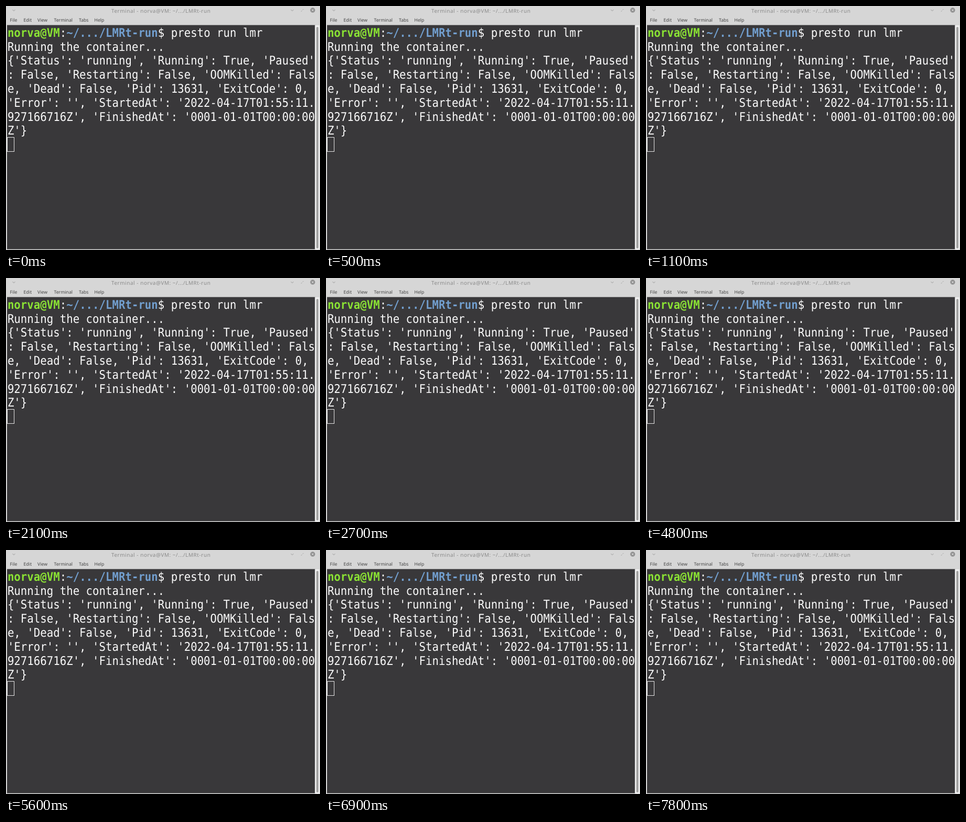
Animation of 599 by 467 pixels, one loop 8 s. Source, as an HTML page:

```html
<!DOCTYPE html>
<html lang="en">
<head>
<meta charset="utf-8">
<title>Terminal</title>
<style>
  html, body { margin: 0; width: 100%; height: 100%; overflow: hidden; background: #d6d6d6; }
  svg { display: block; width: 599px; height: 467px; }
  text { white-space: pre; text-rendering: geometricPrecision; }
  .ui { font-family: "Noto Sans", "Open Sans", sans-serif; }
  .title { font-size: 10px; letter-spacing: .53px; fill: #8a8a8a; }
  .menu { font-size: 8.7px; fill: #444; }
  .term { font: 20.72px "DejaVu Sans Mono", monospace; fill: #fafafa; }
  .user { font-weight: bold; fill: #8ae234; }
  .path { font-weight: bold; fill: #729fcf; }
  .icon { fill: none; stroke: #999; stroke-width: 1; }
</style>
</head>
<body>
<svg viewBox="0 0 599 467">
  <rect width="599" height="467" fill="#d6d6d6"/>
  <rect x="2" y="36.5" width="587.5" height="429" fill="#39383a"/>
  <rect x="589.5" y="37" width="8.5" height="429" fill="#f0f0f0"/>
  <rect x="592" y="40" width="4" height="424" rx="2" fill="#a2a2a2"/>

  <g class="icon">
    <path d="M12.5 7l2.5 2.5 2.5-2.5M543.5 7l2.5 2.5 2.5-2.5"/>
    <path d="M563 10.5l1.5-1.5M566 7.5l1.5-1.5"/>
  </g>
  <circle cx="585" cy="8" r="4.7" fill="#929292"/>
  <path d="M583.3 6.3l3.4 3.4m0-3.4l-3.4 3.4" stroke="#e2e2e2"/>

  <text class="ui title" x="201" y="12.8">Terminal - norva@VM: ~/.../LMRt-run</text>
  <g id="menu" class="ui menu"></g>
  <!-- The screen is recorded slightly taller than wide -->
  <g id="term" class="term" transform="translate(2.9 37.4) scale(1 1.107)"></g>
  <rect x="2.5" y="251.5" width="13" height="27" fill="none" stroke="#e6e6e6"/>
</svg>
<script>
  const NS = "http://www.w3.org/2000/svg";
  const ROW = 24.2, ASCENT = 19.3;

  function add(parent, tag, attrs, content = "") {
    const el = document.createElementNS(NS, tag);
    for (const key in attrs) el.setAttribute(key, attrs[key]);
    el.textContent = content;
    return parent.appendChild(el);
  }

  const menu = document.getElementById("menu");
  const items = { File: 7.5, Edit: 33.5, View: 60, Terminal: 91.5, Tabs: 139, Help: 168.5 };
  for (const name in items) add(menu, "text", { x: items[name], y: 30.2 }, name);

  const term = document.getElementById("term");
  const prompt = add(term, "text", { x: 0, y: ASCENT });
  add(prompt, "tspan", { class: "user" }, "norva@VM");
  add(prompt, "tspan", {}, ":");
  add(prompt, "tspan", { class: "path" }, "~/.../LMRt-run");
  add(prompt, "tspan", {}, "$ presto run lmr");

  // The output is waiting on the container, so the screen holds still.
  [
    "Running the container...",
    "{'Status': 'running', 'Running': True, 'Paused'",
    ": False, 'Restarting': False, 'OOMKilled': Fals",
    "e, 'Dead': False, 'Pid': 13631, 'ExitCode': 0, ",
    "'Error': '', 'StartedAt': '2022-04-17T01:55:11.",
    "927166716Z', 'FinishedAt': '0001-01-01T00:00:00",
    "Z'}"
  ].forEach((line, i) => add(term, "text", { x: 0, y: ASCENT + (i + 1) * ROW }, line));
</script>
</body>
</html>
```
